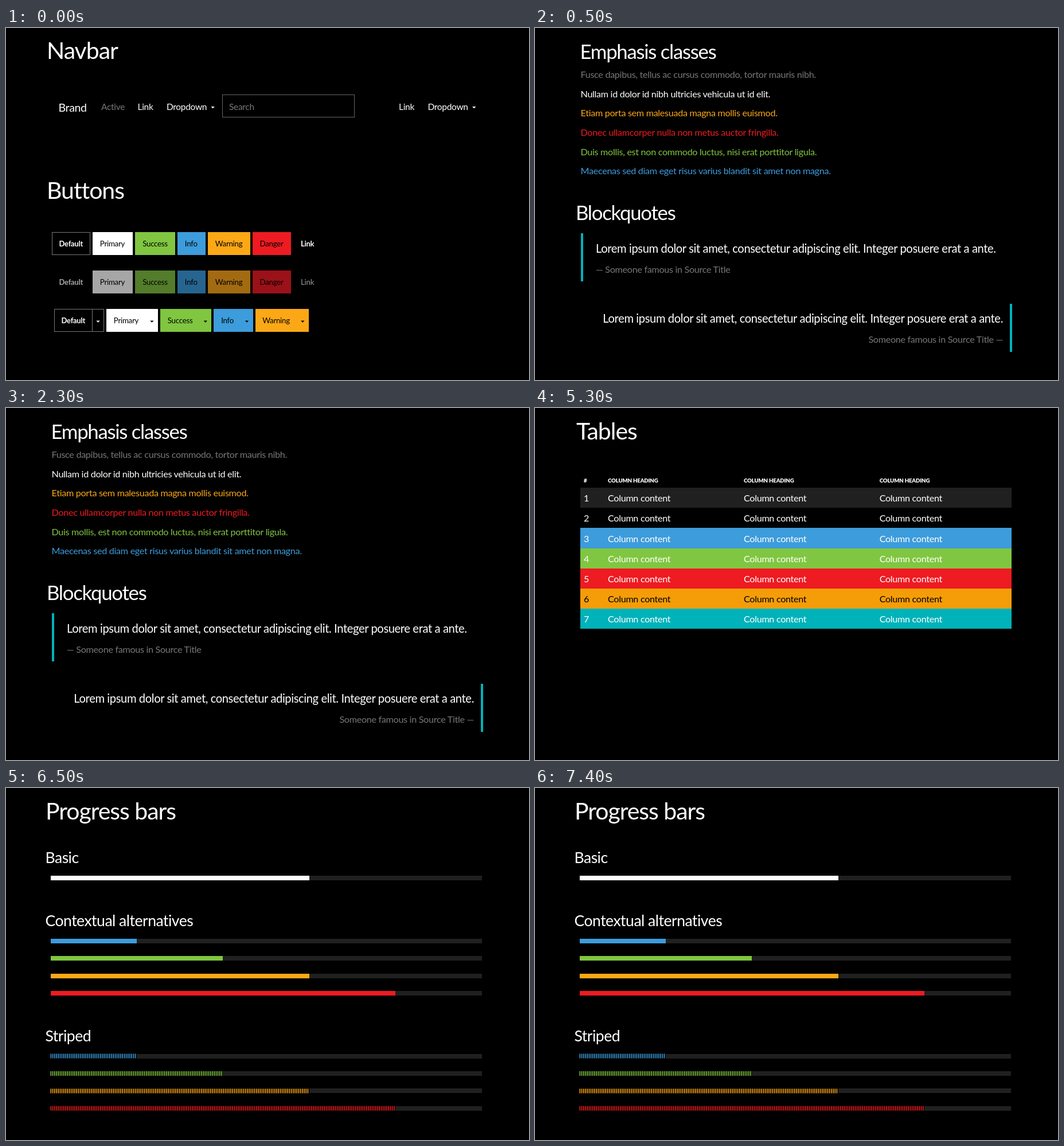
These frames come from a looping animation (912x614 px, 8000 ms). An HTML page:

```html
<!DOCTYPE html>
<html lang="en">
<head>
<meta charset="utf-8">
<title>Theme preview</title>
<style>
html, body { margin: 0; width: 100%; height: 100%; overflow: hidden; background: #000; }
svg { display: block; width: 912px; height: 614px; }
rect { shape-rendering: crispEdges; }
text { font-family: Lato, "Open Sans", sans-serif; letter-spacing: -.02em; white-space: pre; }
.h1 { font-size: 41px; letter-spacing: -.025em; }
.h2 { font-size: 34.8px; letter-spacing: -.037em; }
.h3 { font-size: 26.6px; }
.body { font-size: 16.2px; }
.nav { font-size: 15.5px; }
.brand { font-size: 19.6px; }
.quote { font-size: 20.2px; }
.button { font-size: 13.3px; }
.strong { font-size: 13px; font-weight: 700; }
.head { font-size: 9.7px; font-weight: 900; }
</style>
</head>
<body>
<svg id="stage" viewBox="0 0 912 614"></svg>
<script>
const stage = document.getElementById('stage');
const WHITE = '#fff', BLACK = '#000', GRAY = '#777', TRACK = '#202020';
const BLUE = '#3d9cdb', GREEN = '#80c640', ORANGE = '#fca816', RED = '#ee1b22', TEAL = '#00b2b9';
let scene;

function add(tag, attrs, parent = scene) {
  const node = document.createElementNS('http://www.w3.org/2000/svg', tag);
  for (const key in attrs) node.setAttribute(key, attrs[key]);
  return parent.appendChild(node);
}

function text(style, x, y, content, fill = WHITE, anchor = 'start') {
  add('text', { class: style, x, y, fill, 'text-anchor': anchor }).textContent = content;
}

function rect(x, y, width, height, fill) {
  add('rect', { x, y, width, height, fill });
}

function outline(x, y, width, height, stroke) {
  add('rect', { x: x + .5, y: y + .5, width: width - 1, height: height - 1, fill: 'none', stroke });
}

function caret(x, y, fill) {
  add('path', { d: `M${x} ${y}h6.4l-3.2 3.2z`, fill });
}

function newScene(draw) {
  scene = add('g', { visibility: 'hidden' }, stage);
  draw();
  return scene;
}

function drawButtons() {
  text('h1', 71, 54, 'Navbar');
  text('brand', 91.5, 146, 'Brand');
  text('nav', 166, 142.5, 'Active', GRAY);
  for (const [linkX, dropX] of [[229.5, 280], [685, 735.5]]) {
    text('nav', linkX, 142.5, 'Link');
    text('nav', dropX, 142.5, 'Dropdown');
    caret(dropX + 77.5, 137, WHITE);
  }
  outline(377, 116, 231, 40, '#666');
  text('nav', 389, 142.5, 'Search', GRAY);

  text('h1', 71, 298, 'Buttons');
  const buttons = [
    ['Primary', 151, 70, WHITE, '#a6a6a6', 175, 90],
    ['Success', 225.4, 69.6, GREEN, '#537d2a', 269, 89.4],
    ['Info', 299, 48.6, BLUE, '#26658f', 362.4, 68.2],
    ['Warning', 352, 73.6, ORANGE, '#a36b11', 434.5, 93.4],
    ['Danger', 429.7, 67.3, RED, '#9b1118']
  ];
  outline(80, 356, 67, 40, GRAY);
  text('strong', 92.5, 381, 'Default');
  text('strong', 92.5, 448, 'Default', '#a6a6a6');
  outline(84, 490, 87, 40, GRAY);
  rect(150, 490, 1, 40, GRAY);
  text('strong', 96.5, 515, 'Default');
  caret(157.4, 510.5, WHITE);
  for (const [label, x, width, color, dimmed, splitX, splitWidth] of buttons) {
    rect(x, 356, width, 40, color);
    text('button', x + 12.8, 381, label, BLACK);
    rect(x, 423, width, 40, dimmed);
    text('button', x + 12.8, 448, label, BLACK);
    if (!splitX) continue;
    rect(splitX, 490, splitWidth, 40, color);
    text('button', splitX + 12.8, 515, label, BLACK);
    caret(splitX + splitWidth - 13.8, 510.5, BLACK);
  }
  text('strong', 514, 381, 'Link');
  text('button', 514, 448, 'Link', '#999');
}

function drawTypography() {
  text('h2', 78.5, 54, 'Emphasis classes');
  [
    ['Fusce dapibus, tellus ac cursus commodo, tortor mauris nibh.', GRAY],
    ['Nullam id dolor id nibh ultricies vehicula ut id elit.', WHITE],
    ['Etiam porta sem malesuada magna mollis euismod.', ORANGE],
    ['Donec ullamcorper nulla non metus auctor fringilla.', RED],
    ['Duis mollis, est non commodo luctus, nisi erat porttitor ligula.', GREEN],
    ['Maecenas sed diam eget risus varius blandit sit amet non magna.', BLUE]
  ].forEach(([line, color], i) => text('body', 79.5, 87.2 + 33.6 * i, line, color));

  const quote = 'Lorem ipsum dolor sit amet, consectetur adipiscing elit. Integer posuere erat a ante.';
  const author = 'Someone famous in Source Title';
  text('h2', 71, 335, 'Blockquotes');
  rect(80, 358, 4, 84, TEAL);
  text('quote', 106, 392, quote);
  text('body', 106, 426.5, '— ' + author, GRAY);
  rect(828, 480.5, 4, 84, TEAL);
  text('quote', 816, 514, quote, WHITE, 'end');
  text('body', 816, 548.5, author + ' —', GRAY, 'end');
}

function drawTable() {
  const columns = [127, 364, 600.7];
  text('h1', 72, 55, 'Tables');
  text('head', 85, 129.5, '#');
  for (const x of columns) text('head', x, 129.5, 'COLUMN HEADING');
  [TRACK, BLACK, BLUE, GREEN, RED, '#f59d08', TEAL].forEach((color, i) => {
    const y = 139 + 35.2 * i, ink = i === 5 ? BLACK : WHITE;
    rect(79, y, 752, 35.2, color);
    text('body', 85, y + 24.2, i + 1, ink);
    for (const x of columns) text('body', x, y + 24.2, 'Column content', ink);
  });
}

function drawProgress() {
  const bar = (y, share, color, striped) => {
    const width = 752 * share;
    rect(77.6, y, 752, 8, TRACK);
    rect(77.6, y, width, 8, striped ? BLACK : color);
    if (striped) add('path', {
      d: `M77.6 ${y + 4}h${width}`, stroke: color, 'stroke-width': 8, 'stroke-dasharray': '1.6 1.6'
    });
  };
  text('h1', 69, 55, 'Progress bars');
  text('h3', 68.5, 131, 'Basic');
  bar(153.4, .6, WHITE);
  text('h3', 68.5, 240.5, 'Contextual alternatives');
  text('h3', 68.5, 441.5, 'Striped');
  [BLUE, GREEN, ORANGE, RED].forEach((color, i) => {
    const share = .2 * (i + 1);
    bar(263 + 30.4 * i, share, color);
    bar(463.6 + 30.4 * i, share, color, true);
  });
}

const scenes = [drawButtons, drawTypography, drawTable, drawProgress].map(newScene);
const starts = [0, 500, 3500, 6500];
const LOOP = 8000;

function render(now) {
  const time = now % LOOP;
  const current = starts.filter(start => start <= time).length - 1;
  scenes.forEach((group, i) => group.setAttribute('visibility', i === current ? 'visible' : 'hidden'));
}

const origin = performance.now();
function tick() {
  render(performance.now() - origin);
  requestAnimationFrame(tick);
}
tick();
</script>
</body>
</html>
```
